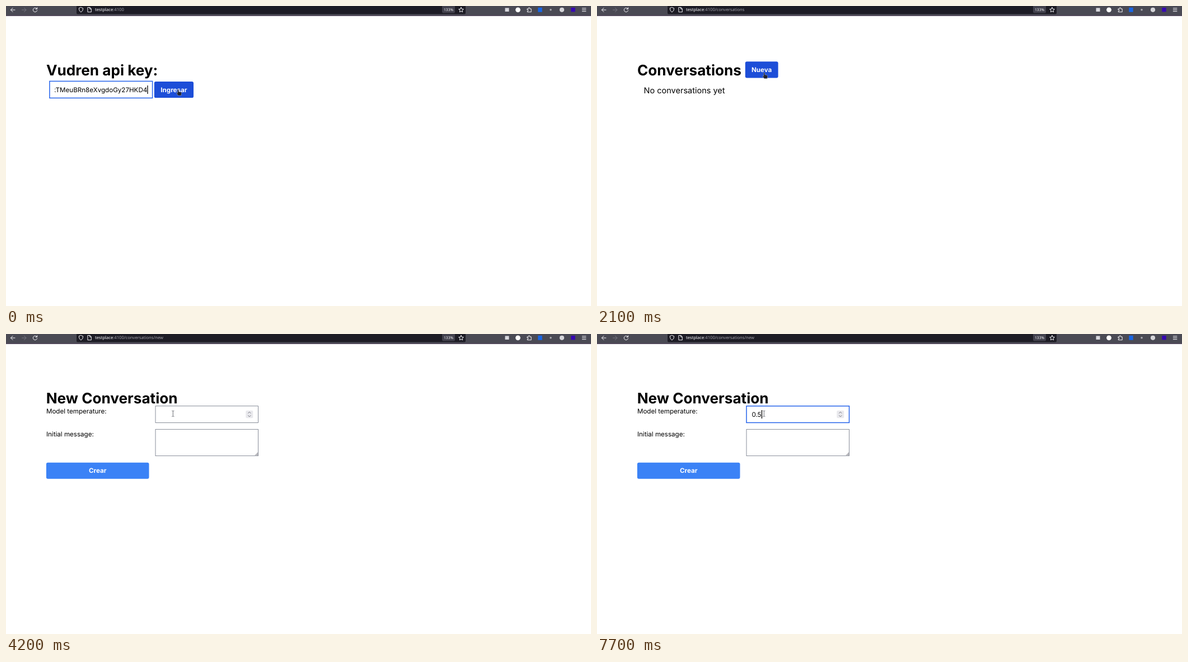
Animation of 1045x536 px, one loop 8000 ms. Source, as an HTML page:

```html
<!DOCTYPE html>
<html lang="es">
<head>
<meta charset="utf-8">
<title>Conversations</title>
<style>
html, body { margin: 0; width: 100%; height: 100%; overflow: hidden; background: #fff; }
svg { display: block; width: 100vw; height: 100vh; }
text { font: 11.61px Inter, sans-serif; text-rendering: geometricPrecision; white-space: pre; }
.title { font-size: 26.13px; font-weight: 700; }
.note { font-size: 14.51px; }
.label { font-weight: 700; fill: #fff; text-anchor: middle; }
.button { fill: #3b82f6; }
.button.hover { fill: #1d4ed8; }
.field { fill: #fff; stroke: #6b7280; stroke-width: .8; }
.field.focus { stroke: #2563eb; stroke-width: 1.5; }
.ui { font: 7.62px "Noto Sans", sans-serif; fill: #fbfbfe; }
.dim { fill: #a3a2aa; }
.icon { fill: none; stroke: #f4f4f8; stroke-width: 1; stroke-linecap: round; stroke-linejoin: round; }
.cursor { fill: #20222e; stroke: #d5d7df; stroke-width: .4; }
</style>
</head>
<body>
<svg viewBox="0 0 1045 536">
  <g id="toolbar">
    <path fill="#4a4a54" d="M0 0h1045v18H0z"/>
    <path fill="#54485d" d="M0 16.5h1045v1.5H0z"/>
    <path fill="#1d1c25" d="M126 0h695v12.5q0 2-2 2H128q-2 0-2-2z"/>
    <path fill="#42414d" d="M779 0h23v10.5q0 2-2 2h-19q-2 0-2-2z"/>
    <text class="ui" x="159" y="9.3">testplace<tspan class="dim" id="address"></tspan></text>
    <text class="ui" x="790.5" y="9" style="font-size:6.6px;text-anchor:middle">133%</text>
    <g class="icon">
      <path d="M16 7H8.5M12 3.5 8.5 7l3.5 3.5"/>
      <path stroke="#75757f" d="M28.5 7H36M32.5 3.5 36 7l-3.5 3.5"/>
      <path d="M55 4.8A3.7 3.7 0 1 0 55.6 8M55.6 2.8v2.6H53"/>
      <path d="M134 2.5 137.6 4q.2 5-3.6 7-3.8-2-3.6-7z"/>
      <path d="M146.3 2.5h3.6l2.4 2.4v5.9h-6zM149.7 2.7v2.5h2.4"/>
      <path d="m813 2.5 1.3 2.8 3 .4-2.2 2.1.5 3-2.6-1.4-2.6 1.4.5-3-2.2-2.1 3-.4z"/>
      <path d="M931.3 5h2V4a1.2 1.2 0 0 1 2.4 0v1h2.5v5.7h-6.9V8.8h1.1a1.1 1.1 0 0 0 0-2.1h-1.1z"/>
      <path d="M1029.3 4h6.6M1029.3 6.8h6.6M1029.3 9.6h6.6"/>
    </g>
    <rect x="891.5" y="3.5" width="7" height="6.5" fill="#d8d8de"/>
    <circle cx="914.5" cy="6.8" r="4.4" fill="#fff"/>
    <rect x="950.3" y="2.8" width="7.4" height="8" fill="#1967e5"/>
    <circle cx="973" cy="6.8" r="1.8" fill="#a9a9b0"/>
    <circle cx="993" cy="6.8" r="4.1" fill="#d4d4d8"/>
    <rect x="1009.3" y="3" width="7.4" height="7.4" fill="#3708b2"/>
  </g>

  <g id="keyPage">
    <text class="title" x="72" y="123.5">Vudren api key:</text>
    <rect class="field" id="keyField" x="77.9" y="134.4" width="183.7" height="30"/>
    <clipPath id="keyClip"><path d="M87.3 135h170v29h-170z"/></clipPath>
    <text x="252.3" y="153.8" text-anchor="end" clip-path="url(#keyClip)">mBpkTMeuBRn8eXvgdoGy27HKD4</text>
    <path id="keyCaret" d="M252.3 142h1.3v15h-1.3z"/>
    <rect class="button hover" x="264.8" y="134.9" width="70.2" height="29.2" rx="2.9"/>
    <text class="label" x="299.9" y="153.8">Ingresar</text>
  </g>

  <g id="listPage">
    <text class="title" x="72" y="123.5">Conversations</text>
    <rect class="button" id="newButton" x="264.8" y="99.3" width="58.8" height="29.2" rx="2.9"/>
    <text class="label" x="294.1" y="118.2">Nueva</text>
    <text class="note" x="83.6" y="155.8">No conversations yet</text>
  </g>

  <g id="formPage">
    <text class="title" x="71.7" y="123.5">New Conversation</text>
    <text x="71.9" y="142">Model temperature:</text>
    <text x="71.9" y="183.3">Initial message:</text>
    <rect class="field" id="tempField" x="267" y="128.7" width="183.5" height="29.7"/>
    <rect x="428.3" y="136.8" width="13" height="13.4" rx="2" fill="#e9e9ed"/>
    <path class="icon" style="stroke:#70707a" d="m432.6 141.4 2.2-2.2 2.2 2.2M432.6 145.6l2.2 2.2 2.2-2.2"/>
    <rect class="field" x="267" y="170.3" width="183.5" height="47.4"/>
    <path fill="#b9b9be" d="M450 211v6.2h-6.2z"/>
    <rect class="button" x="71.9" y="229.7" width="183.6" height="29" rx="2.9"/>
    <text class="label" x="163.7" y="248.4">Crear</text>
    <text id="tempValue" x="276.4" y="147.6"></text>
    <path id="tempCaret" d="M0 136h1.3v15H0z"/>
  </g>

  <g id="status">
    <path fill="#2b2a33" d="M0 523.5h119q2 0 2 2V536H0z"/>
    <text class="ui" x="1.3" y="533.4" style="font-size:7.26px">testplace:4100/conversations/new</text>
  </g>

  <path class="cursor" id="arrow" d="M0 0v9l2-1.7 1.6 3.3 1.4-.7-1.5-3.2 2.5-.3z"/>
  <path class="cursor" id="hand" d="M0 0q1 0 1 1v3l4 1q1 .3 1 1.5L5.4 11H0L-3 6.8q.3-1.1 1.2-.7l.8.8V1q0-1 1-1z"/>
  <path id="beam" fill="none" stroke="#5c5e66" stroke-width=".9" d="M-2-5.2q1.6 0 2 .8.4-.8 2-.8M0-4.6V4.6M-2 5.2q1.6 0 2-.8.4.8 2 .8"/>
</svg>
<script>
const LOOP = 8000;
const $ = id => document.getElementById(id);
const show = (id, on) => $(id).style.display = on ? '' : 'none';
const place = (id, x, y) => $(id).setAttribute('transform', `translate(${x} ${y})`);

function pointer(t) {
  if (t < 900) return ['hand', 307.5, 149];
  if (t < 3500) {
    const p = Math.min(1, Math.max(0, (t - 1800) / 700));
    const eased = 1 - (1 - p) ** 2.4;
    const y = 149 - 41 * eased;
    return [y < 128.5 ? 'hand' : 'arrow', 306.5 - 10.5 * eased, y];
  }
  if (t < 4000) return ['beam', 297, 109.5];
  return t < 4200 ? ['beam', 298, 137.5] : ['beam', 298.3, 142.3];
}

function render(time) {
  const t = Math.floor(time % LOOP / 100) * 100;
  const page = t < 900 ? 'keyPage' : t < 3500 ? 'listPage' : 'formPage';
  for (const id of ['keyPage', 'listPage', 'formPage']) show(id, id === page);
  $('address').textContent = ':4100' + { keyPage: '', listPage: '/conversations', formPage: '/conversations/new' }[page];

  show('keyCaret', t < 300);
  $('keyField').classList.toggle('focus', t < 500);

  const [shape, x, y] = pointer(t);
  for (const id of ['arrow', 'hand', 'beam']) show(id, id === shape);
  place(shape, x, y);
  $('newButton').classList.toggle('hover', shape === 'hand');

  show('status', t >= 2300 && t < 3700);
  $('status').style.opacity = t < 3500 ? 1 : .32;

  const typed = [6400, 7000, 7700].filter(at => t >= at).length;
  $('tempField').classList.toggle('focus', t >= 5600);
  $('tempValue').textContent = '0.5'.slice(0, typed);
  show('tempCaret', t >= 5600 && (t < 6800 || t >= 7000));
  place('tempCaret', [276.3, 283.7, 286.8, 293.8][typed], 0);
}

const start = performance.now();
function tick() {
  render(performance.now() - start);
  requestAnimationFrame(tick);
}
tick();
</script>
</body>
</html>
```
